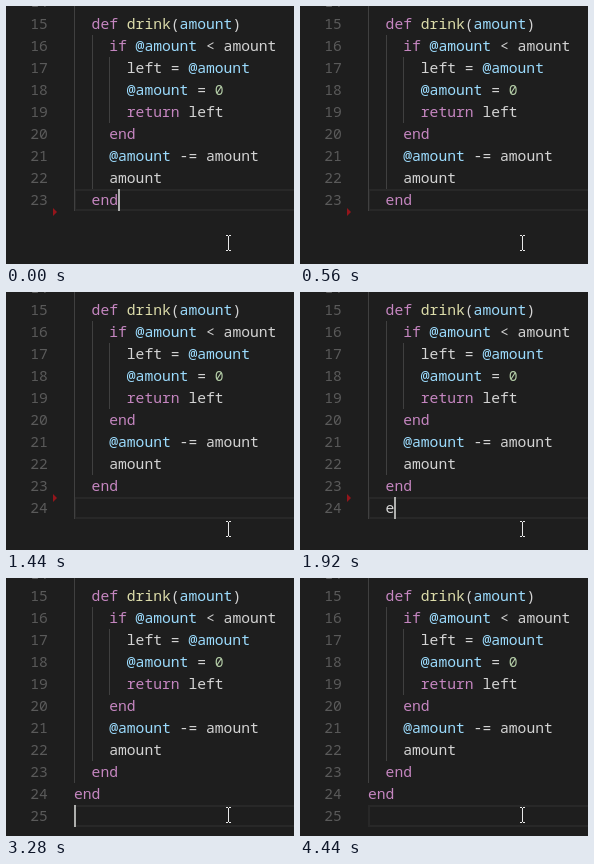
An HTML page with a canvas for the animation above (4.48 s loop, 288 px wide and 258 px high).

```html
<!DOCTYPE html>
<html lang="en">
<head>
<meta charset="utf-8">
<title>Typing in a code editor</title>
<style>
html, body { margin: 0; width: 100%; height: 100%; overflow: hidden; background: #1e1e1e; }
canvas { display: block; }
</style>
</head>
<body>
<canvas id="stage" width="288" height="258"></canvas>
<script>
const ctx = document.getElementById('stage').getContext('2d');
const LOOP = 4480, CHAR = 8.8, ROW = 22, LEFT = 68, FIRST = 14;
const ENTER = 800, KEYS = [1800, 1960, 2080], MARK = 2280, ENTER2 = 2920, CLEAN = 3080;
const BLINK = 520;

const code = [
  '',
  '  def drink(amount)',
  '    if @amount < amount',
  '      left = @amount',
  '      @amount = 0',
  '      return left',
  '    end',
  '    @amount -= amount',
  '    amount',
  '  end'
];

// Token groups: keyword, variable or parameter, number, function name, anything else
const token = /(\b(?:def|if|return|end)\b)|(@\w+|(?<=\()\w+)|(\d+)|(\w+(?=\())|(\w+|[^\s\w@]+)/g;
const colors = ['#c586c0', '#9cdcfe', '#b5cea8', '#dcdcaa', '#d4d4d4'];

const rowTop = n => 7 + (n - 15) * ROW;
const colX = c => LEFT + c * CHAR;

function rect(color, x, y, w, h) {
  ctx.fillStyle = color;
  ctx.fillRect(x, y, w, h);
}

function text(str, x, n, color) {
  ctx.fillStyle = color;
  ctx.fillText(str, x, rowTop(n) + 16);
}

function drawLine(line, n) {
  text(n, 24.2, n, '#5a5a5a');
  for (const m of line.matchAll(token))
    text(m[0], colX(m.index), n, colors[m.slice(1).findIndex(Boolean)]);
}

function guide(col, from, to) {
  rect('#404040', Math.round(colX(col)), rowTop(from), 1, (to - from + 1) * ROW);
}

function drawPointer() {
  rect('#e8e8e8', 222, 230, 1, 14);
  for (const y of [229, 244]) {
    rect('#e8e8e8', 220, y, 2, 1);
    rect('#e8e8e8', 223, y, 2, 1);
  }
}

function draw(t) {
  const typed = KEYS.filter(k => t >= k).length;
  const lines = [...code];
  if (t >= ENTER) lines.push((t < ENTER2 ? '  ' : '') + 'end'.slice(0, typed));
  if (t >= ENTER2) lines.push('');
  const last = FIRST + lines.length - 1;
  const top = rowTop(last);

  rect('#1e1e1e', 0, 0, 288, 258);
  ctx.strokeStyle = '#282828';
  ctx.lineWidth = 2;
  ctx.strokeRect(LEFT + 1, top + 1, 240, ROW - 2);

  guide(0, 14, t >= ENTER && t < ENTER2 ? 24 : 23);
  guide(2, 16, 22);
  guide(4, 17, 19);

  ctx.font = '14.667px "Noto Sans Mono", "DejaVu Sans Mono", monospace';
  lines.forEach((line, i) => drawLine(line, FIRST + i));

  // Change markers beside the line numbers
  if (t < MARK) {
    ctx.fillStyle = '#94151b';
    ctx.beginPath();
    ctx.moveTo(47, 202);
    ctx.lineTo(51, 206);
    ctx.lineTo(47, 210);
    ctx.fill();
  } else if (t < CLEAN) {
    rect('#0c7d9d', 47, rowTop(24), 3, ROW);
  }

  // Every key press restarts the blink
  const pressed = [0, ENTER, ...KEYS, ENTER2].filter(k => t >= k).pop();
  if (Math.floor((t - pressed) / BLINK) % 2 === 0 && t < 4440)
    rect('#aeafad', Math.round(colX(lines[lines.length - 1].length)), top, 2, ROW);

  drawPointer();
}

function frame() {
  draw(performance.now() % LOOP);
  requestAnimationFrame(frame);
}
frame();
</script>
</body>
</html>
```
